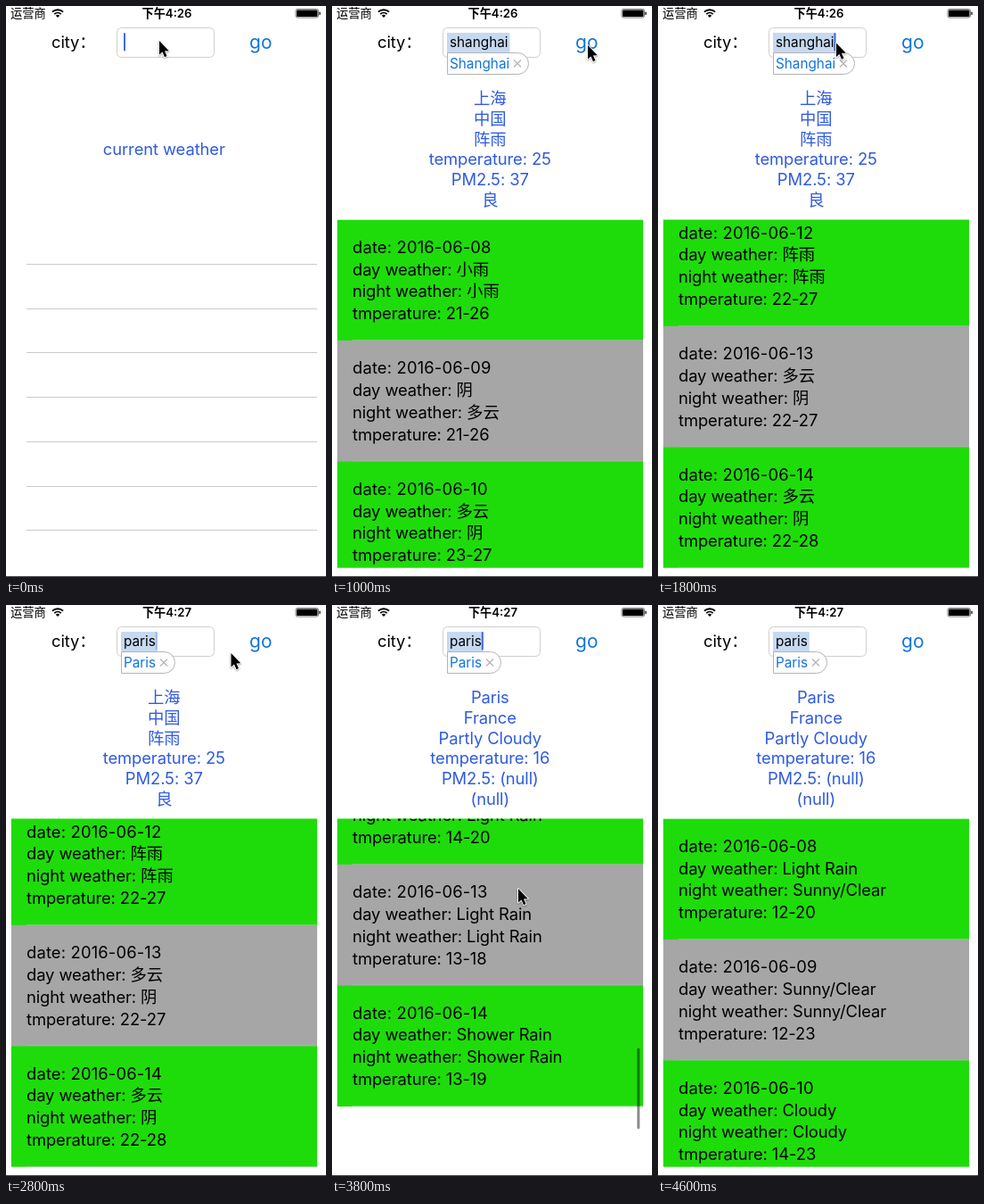
These frames come from a looping animation (359x640 px, 4800 ms). An HTML page with a canvas:

```html
<!DOCTYPE html>
<html lang="zh-CN">
<head>
<meta charset="utf-8">
<title>Weather</title>
<style>
html, body { margin: 0; width: 100%; height: 100%; overflow: hidden; background: #fff; }
canvas { display: block; width: 359px; height: 640px; }
</style>
</head>
<body>
<canvas id="stage"></canvas>
<script>
const W = 359, H = 640, LOOP = 4800, STEP = 200;
const canvas = document.getElementById('stage');
const ctx = canvas.getContext('2d');
const dpr = window.devicePixelRatio || 1;
canvas.width = W * dpr;
canvas.height = H * dpr;

const FONT = 'Inter, "Noto Sans CJK SC", "Noto Sans CJK", sans-serif';
const BLUE = '#2f5bdf', LINK = '#1173dc', GREEN = '#1edc0a', GRAY = '#a6a6a6';
const TABLE = { x: 5.7, y: 239.4, w: 343.6, h: 390.4 };
const FIELD_SIZE = 15.3;
const ROW = 135.5, CONTENT = ROW * 7, END = CONTENT - TABLE.h;

const CITIES = {
  shanghai: {
    head: ['上海', '中国', '阵雨', 'temperature: 25', 'PM2.5: 37', '良'],
    days: ['小雨|小雨|21-26', '阴|多云|21-26', '多云|阴|23-27', '阵雨|阵雨|22-26',
           '阵雨|阵雨|22-27', '多云|阴|22-27', '多云|阴|22-28']
  },
  paris: {
    head: ['Paris', 'France', 'Partly Cloudy', 'temperature: 16', 'PM2.5: (null)', '(null)'],
    days: ['Light Rain|Sunny/Clear|12-20', 'Sunny/Clear|Sunny/Clear|12-23', 'Cloudy|Cloudy|14-23',
           'Cloudy|Light Rain|14-21', 'Light Rain|Light Rain|14-20', 'Light Rain|Light Rain|13-18',
           'Shower Rain|Shower Rain|13-19']
  }
};

// Each entry overrides the state from its time on.
const KEYS = [
  [0, { clock: '下午4:26', text: '', tip: '', caret: 1, mouse: [171.5, 39], city: null, off: 0, bar: 0 }],
  [200, { caret: 0 }],
  [400, { text: 's', mouse: null }],
  [600, { text: 'shang', caret: 1 }],
  [800, { text: 'shanghai', tip: 'Shanghai', mouse: [286, 43] }],
  [1000, { city: 'shanghai', caret: 0, mouse: [286.5, 44] }],
  [1200, { mouse: [204.5, 414] }],
  [1400, { off: 165, bar: 1, mouse: [204.5, 248.5] }],
  [1600, { off: 520, mouse: [203, 150] }],
  [1800, { off: END, bar: 0, caret: 1, mouse: [199.5, 41.5] }],
  [2000, { tip: '', mouse: null }],
  [2200, { text: '' }],
  [2400, { text: 'pa', clock: '下午4:27' }],
  [2600, { text: 'paris', tip: 'Paris' }],
  [2800, { caret: 0.3, mouse: [252, 54] }],
  [3000, { caret: 0, mouse: [283, 45] }],
  [3200, { caret: 1, mouse: [289, 42] }],
  [3400, { caret: 0, city: 'paris' }],
  [3600, { caret: 0.5 }],
  [3800, { caret: 1, off: END + 68, bar: 1, mouse: [208.5, 318] }],
  [4000, { caret: 0, off: 310, mouse: [211, 470] }],
  [4200, { caret: 1, off: 0, mouse: [211, 540] }],
  [4400, { bar: 0, mouse: null }],
  [4600, { caret: 0 }]
];

function stateAt(t) {
  const s = {};
  for (const [at, change] of KEYS) if (at <= t) Object.assign(s, change);
  return s;
}

function write(str, x, y, size, color, { align = 'left', weight = 400, gap = 0 } = {}) {
  ctx.font = `${weight} ${size}px ${FONT}`;
  ctx.letterSpacing = gap + 'px';
  ctx.textAlign = align;
  ctx.fillStyle = color;
  ctx.fillText(str, x, y);
}

function body(str, x, y, color, align, gap = -0.1) {
  write(str, x, y, 18.4, color, { align, gap });
}

function fieldWidth(str) {
  ctx.font = `400 ${FIELD_SIZE}px ${FONT}`;
  ctx.letterSpacing = '0px';
  return ctx.measureText(str).width;
}

function box(x, y, w, h, color) {
  ctx.fillStyle = color;
  ctx.fillRect(x, y, w, h);
}

function rounded(x, y, w, h, r, fill, stroke) {
  ctx.beginPath();
  ctx.roundRect(x, y, w, h, r);
  if (fill) { ctx.fillStyle = fill; ctx.fill(); }
  if (stroke) { ctx.strokeStyle = stroke; ctx.lineWidth = 1; ctx.stroke(); }
}

function drawStatus(clock) {
  write('运营商', 5, 13, 13.3, '#000');
  write(clock, 180.5, 13, 13.2, '#000', { align: 'center', weight: 600 });

  // wifi
  const cx = 58, cy = 13, a = Math.PI / 4.1;
  ctx.strokeStyle = '#000';
  ctx.lineWidth = 1.9;
  for (const r of [5.4, 8.8]) {
    ctx.beginPath();
    ctx.arc(cx, cy, r, -Math.PI / 2 - a, -Math.PI / 2 + a);
    ctx.stroke();
  }
  ctx.beginPath();
  ctx.moveTo(cx, cy);
  ctx.arc(cx, cy, 3.2, -Math.PI / 2 - a, -Math.PI / 2 + a);
  ctx.fillStyle = '#000';
  ctx.fill();

  // battery
  rounded(325, 3.5, 25.5, 9.5, 2, null, '#777');
  rounded(326, 4.5, 23.5, 7.5, 1, '#000');
  rounded(351.3, 6.5, 1.5, 3.6, 0.7, '#333');
}

function drawField({ text, tip, caret }) {
  body('city：', 51, 47, '#000');
  rounded(124.5, 24.5, 109, 33, 5, '#fff', '#cfcfcf');
  write('go', 273, 48, 21, LINK);

  const end = 132 + fieldWidth(text);
  if (tip) box(129, 30, end + 2 - 129, 22, '#c6d9f0');
  write(text, 132, 46, FIELD_SIZE, '#000');
  if (caret) {
    ctx.globalAlpha = caret;
    rounded(end, 30, 2, 20.5, 1, '#4169e1');
    ctx.globalAlpha = 1;
  }
  if (tip) drawTip(tip);
}

function drawTip(tip) {
  const right = Math.round(132 + fieldWidth(tip) + 20.5) + 0.5;
  rounded(129.5, 52.5, right - 129.5, 24, [0, 12, 12, 0], '#fff', '#b4b4b4');
  write(tip, 132, 70, FIELD_SIZE, LINK);
  const x = right - 12.5, y = 64.5, r = 4;
  ctx.beginPath();
  ctx.moveTo(x - r, y - r); ctx.lineTo(x + r, y + r);
  ctx.moveTo(x + r, y - r); ctx.lineTo(x - r, y + r);
  ctx.strokeStyle = '#b2b2b2';
  ctx.lineWidth = 1.1;
  ctx.stroke();
}

function drawHead(city) {
  if (!city) return body('current weather', 177.3, 167, BLUE, 'center');
  city.head.forEach((line, i) => body(line, 177.3, 110.2 + i * 22.75, BLUE, 'center'));
}

function drawRow(day, i, y) {
  const [dayWeather, night, temp] = day.split('|');
  box(TABLE.x, y, TABLE.w, ROW + 0.4, i % 2 ? GRAY : GREEN);
  box(23, y + ROW - 0.5, TABLE.x + TABLE.w - 23, 0.5, '#c8c8c8');
  body('date: 2016-06-' + String(8 + i).padStart(2, '0'), 23, y + 37.3, '#000', 'left', 0.15);
  const lines = ['day weather: ' + dayWeather, 'night weather: ' + night, 'tmperature: ' + temp];
  lines.forEach((line, k) => body(line, 23, y + 62.1 + k * 24.85, '#000'));
}

function drawTable(city, off, bar) {
  if (!city) {
    for (let i = 0; i < 7; i++) box(23, Math.round(289 + i * 49.7), 326, 1, '#cbcbcb');
    return;
  }
  ctx.save();
  ctx.beginPath();
  ctx.rect(TABLE.x, TABLE.y, TABLE.w, TABLE.h);
  ctx.clip();
  city.days.forEach((day, i) => drawRow(day, i, TABLE.y + i * ROW - off));
  if (bar) {
    const track = TABLE.h - 4.5;
    const len = track * TABLE.h / CONTENT - Math.max(0, off - END);
    const top = TABLE.y + 2.3;
    const y = Math.min(top + off / CONTENT * track, top + track - len);
    rounded(342.3, y, 3, len, 1.5, 'rgba(0,0,0,0.45)');
  }
  ctx.restore();
}

function drawMouse([x, y]) {
  ctx.save();
  ctx.translate(x, y);
  ctx.beginPath();
  ctx.moveTo(0.5, 0);
  for (const [px, py] of [[0.5, 15.6], [4, 12.4], [6.5, 18.2], [9, 17.1], [6.5, 11.5], [11.3, 11.2]]) ctx.lineTo(px, py);
  ctx.closePath();
  ctx.shadowColor = 'rgba(0,0,0,0.35)';
  ctx.shadowBlur = 2 * dpr;
  ctx.shadowOffsetY = dpr;
  ctx.strokeStyle = '#fff';
  ctx.lineWidth = 1.8;
  ctx.lineJoin = 'round';
  ctx.stroke();
  ctx.shadowColor = 'transparent';
  ctx.fillStyle = '#000';
  ctx.fill();
  ctx.restore();
}

function draw(t) {
  const s = stateAt(Math.floor(t / STEP) * STEP);
  const city = CITIES[s.city];
  ctx.setTransform(dpr, 0, 0, dpr, 0, 0);
  box(0, 0, W, H, '#fff');
  drawStatus(s.clock);
  drawHead(city);
  drawTable(city, s.off, s.bar);
  drawField(s);
  box(0, 639, W, 1, '#4c4c4c');
  if (s.mouse) drawMouse(s.mouse);
}

const start = performance.now();
function tick() {
  draw((performance.now() - start) % LOOP);
  requestAnimationFrame(tick);
}
tick();
</script>
</body>
</html>
```
